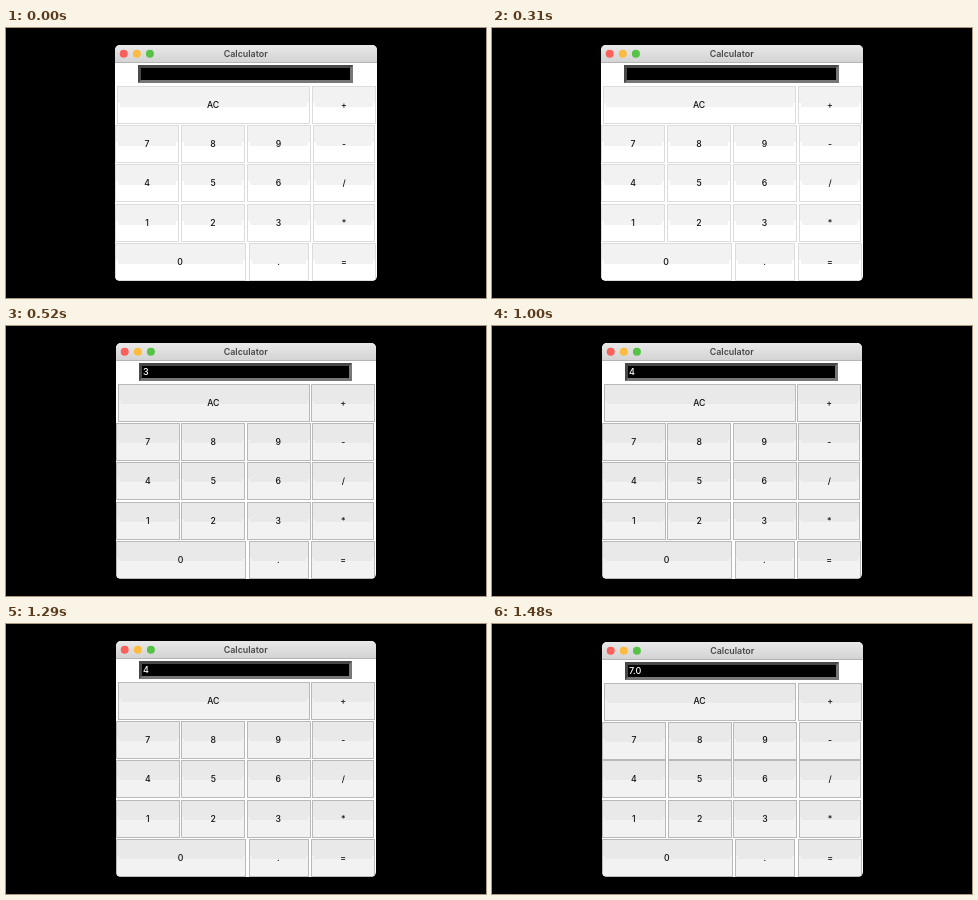
Write an HTML page with a canvas that moves like this. It is 480 by 270 pixels and loops after 1.96 s.

```html
<!DOCTYPE html>
<html lang="en">
<head>
<meta charset="utf-8">
<title>Calculator</title>
<style>
html, body { margin: 0; width: 100%; height: 100%; overflow: hidden; background: #000; }
canvas { display: block; }
</style>
</head>
<body>
<canvas id="stage" width="480" height="270"></canvas>
<script>
const ctx = document.getElementById('stage').getContext('2d');
const LOOP = 1960;

// Window edges, display text and button look over time
const states = [
  { start: 0, left: 109, right: 371, top: 17, text: '', idle: true },
  { start: 520, left: 110, right: 370, top: 17, text: '3' },
  { start: 1000, left: 110, right: 370, top: 17, text: '4' },
  { start: 1480, left: 110, right: 371, top: 18, text: '7.0' }
];

const columns = [[109, 173], [175, 239], [241, 305], [307, 369]];
const rowTops = [58, 97, 136, 176, 215];
const keys = [['AC', 0, 111, 304, 207], ['+', 0, 306, 370, 338]];
['789-', '456/', '123*'].forEach((row, r) =>
  [...row].forEach((label, c) => {
    const [a, b] = columns[c];
    keys.push([label, r + 1, a, b, [141, 207, 272.5, 338][c]]);
  }));
keys.push(['0', 4, 109, 240, 174], ['.', 4, 243, 303, 272.5], ['=', 4, 306, 370, 338]);

function rect(color, x, y, w, h) {
  ctx.fillStyle = color;
  ctx.fillRect(x, y, w, h);
}

function label(text, x, y, color, weight, size, align = 'center') {
  ctx.font = `${weight} ${size}px Inter, sans-serif`;
  ctx.textAlign = align;
  ctx.fillStyle = color;
  ctx.fillText(text, x, y);
}

function drawKey(x, y, w, h, idle) {
  rect(idle ? '#dcdcdc' : '#b9b9b9', x, y, w, h);
  rect(idle ? '#fff' : '#f2f2f2', x + 1, y + 1, w - 2, h - 2);
  const shade = idle ? '#f2f2f2' : '#e9e9e9';
  rect(shade, x + 1, y + 1, w - 2, 16);
  rect(shade, x + 3, y + 17, w - 6, idle ? 4 : 3);
}

function drawDisplay(x, y, right, bottom, text) {
  const w = right - x, h = bottom - y;
  rect('#777', x, y, w, h);
  ctx.fillStyle = '#484848';
  ctx.beginPath();
  ctx.moveTo(x, bottom);
  ctx.lineTo(x, y);
  ctx.lineTo(right, y);
  ctx.lineTo(right - 3, y + 3);
  ctx.lineTo(x + 3, y + 3);
  ctx.lineTo(x + 3, bottom - 3);
  ctx.fill();
  rect('#000', x + 3, y + 3, w - 6, h - 6);
  label(text, x + 4, y + 12.3, '#fff', 500, 9, 'left');
}

function draw({ left, right, top, text, idle }) {
  const mapX = x => left + (x - 109) * (right - left) / 262;
  const mapY = y => top + (y - 17) * (253 - top) / 236;
  const px = x => Math.round(mapX(x)), py = y => Math.round(mapY(y));

  rect('#000', 0, 0, 480, 270);
  ctx.save();
  ctx.beginPath();
  ctx.roundRect(left, top, right - left, 253 - top, 5);
  ctx.clip();
  rect('#fff', left, top, right - left, 253 - top);

  const bar = ctx.createLinearGradient(0, top, 0, top + 18);
  bar.addColorStop(0, '#e9e9e9');
  bar.addColorStop(1, '#d2d2d2');
  rect(bar, left, top, right - left, 18);
  rect('#b4b4b4', left, top + 17, right - left, 1);
  ['#fc605b', '#fdbc40', '#57c346'].forEach((color, i) => {
    ctx.fillStyle = color;
    ctx.beginPath();
    ctx.arc(left + 8.7 + i * 13.1, top + 8.8, 4, 0, Math.PI * 2);
    ctx.fill();
  });
  label('Calculator', (left + right) / 2 - 0.3, top + 11.6, '#484848', 600, 8.9);

  drawDisplay(px(132), py(37), px(347), py(55), text);
  for (const [name, row, a, b, center] of keys) {
    const x = px(a), y = py(rowTops[row]);
    drawKey(x, y, px(b) - x, py(rowTops[row] + 38) - y, idle);
    label(name, mapX(center), mapY(rowTops[row] + 21.7), '#111', 500, 8.7);
  }
  ctx.restore();
}

const begin = performance.now();
function tick() {
  const time = (performance.now() - begin) % LOOP;
  draw(states.findLast(state => time >= state.start));
  requestAnimationFrame(tick);
}
tick();
</script>
</body>
</html>
```
